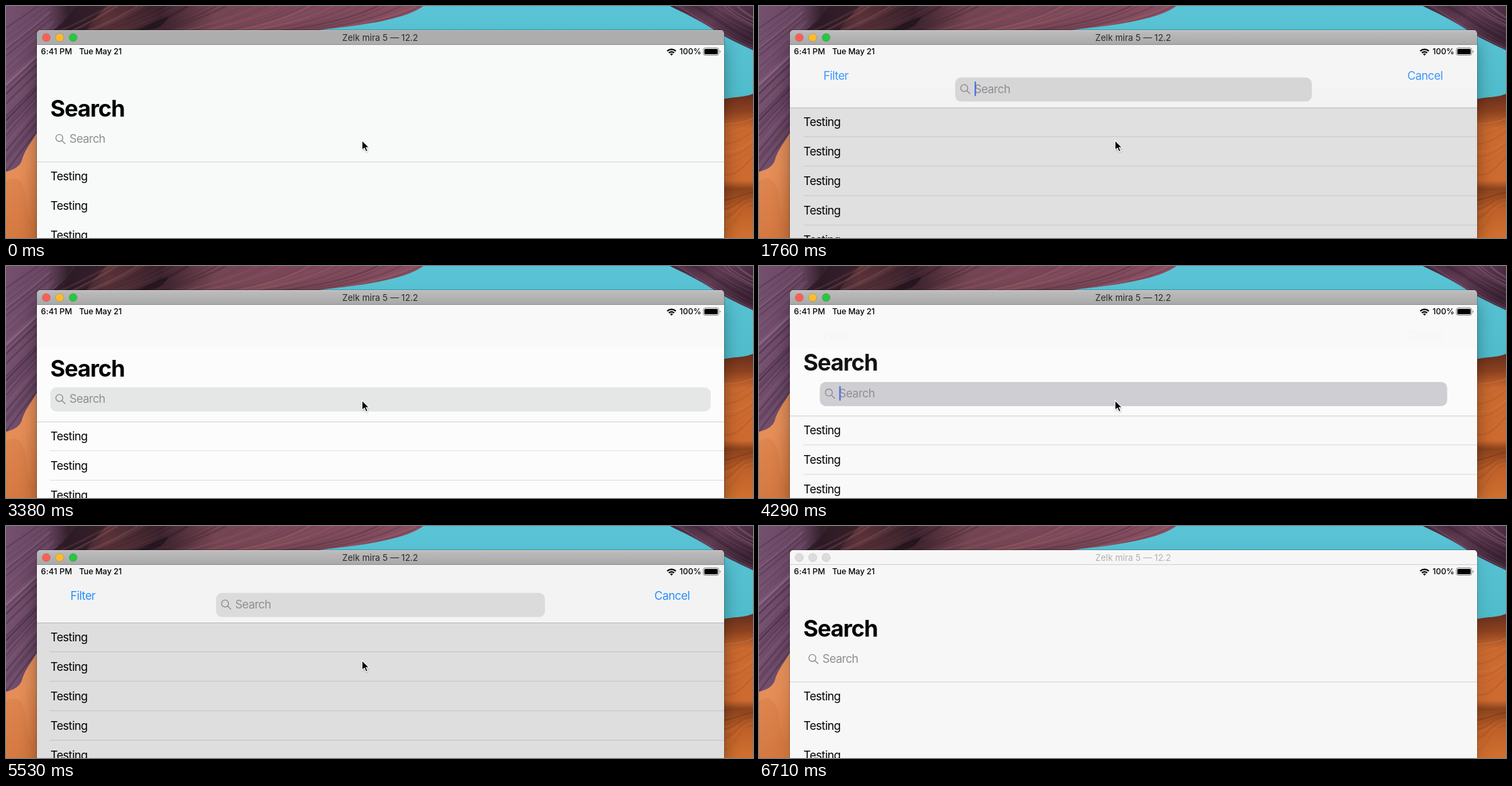
An HTML page for the animation above (6.81 s loop, 1113 by 346 pixels).

```html
<!DOCTYPE html>
<html lang="en">
<head>
<meta charset="utf-8">
<title>Search bar</title>
<style>
  html, body { margin: 0; width: 100%; height: 100%; overflow: hidden; }
  svg { display: block; width: 1113px; height: 346px; }
  text { font-family: Inter, Roboto, sans-serif; white-space: pre; }
  .body { font-size: 17px; letter-spacing: -.5px; }
  .status { font-size: 12px; font-weight: 500; }
  .large { font-size: 34px; font-weight: 700; letter-spacing: -1px; }
  .link { fill: #007aff; }
</style>
</head>
<body>
<svg viewBox="0 0 1113 346" xmlns="http://www.w3.org/2000/svg">
  <defs>
    <linearGradient id="sky" x2="0" y2="1">
      <stop stop-color="#5ac4d6"/><stop offset=".4" stop-color="#4fbccb"/>
    </linearGradient>
    <linearGradient id="plum" gradientUnits="userSpaceOnUse" x1="0" x2="622" y1="0" y2="0">
      <stop stop-color="#74506f"/><stop offset=".1" stop-color="#684560"/>
      <stop offset=".15" stop-color="#33202c"/><stop offset=".24" stop-color="#5b3439"/>
      <stop offset=".37" stop-color="#38212b"/><stop offset=".5" stop-color="#744552"/>
      <stop offset=".75" stop-color="#7b485a"/><stop offset="1" stop-color="#8a5062"/>
    </linearGradient>
    <linearGradient id="dusk" x2="1" y2=".6">
      <stop stop-color="#402639"/><stop offset=".5" stop-color="#5d394f"/><stop offset="1" stop-color="#3a2233"/>
    </linearGradient>
    <linearGradient id="sand" x2=".3" y2="1">
      <stop stop-color="#e09260"/><stop offset=".5" stop-color="#e58d57"/><stop offset="1" stop-color="#d67a40"/>
    </linearGradient>
    <linearGradient id="cliff" x2="0" y2="1">
      <stop stop-color="#672d1f"/><stop offset=".12" stop-color="#8c421f"/>
      <stop offset=".24" stop-color="#cb6a30"/><stop offset=".6" stop-color="#cd6a2f"/>
      <stop offset=".66" stop-color="#8a431d"/><stop offset=".8" stop-color="#bf6029"/>
      <stop offset="1" stop-color="#d0702f"/>
    </linearGradient>
    <linearGradient id="chrome" x2="0" y2="1">
      <stop stop-color="#bdbdbd"/><stop offset="1" stop-color="#a8a8a8"/>
    </linearGradient>
    <filter id="blur" x="-10%" y="-30%" width="120%" height="160%"><feGaussianBlur stdDeviation="13"/></filter>
    <filter id="soft" x="-50%" y="-50%" width="200%" height="200%"><feGaussianBlur stdDeviation="1"/></filter>
    <clipPath id="plumClip"><path id="plumShape" d="M0 0H622C603 14 565 25 480 34L300 60H46V189C36 206 27 216 23 232Q18 243 0 247Z"/></clipPath>
    <clipPath id="duskClip"><path id="duskShape" d="M989 0H1113V66C1092 56 1074 48 1054 35C1034 22 1010 10 989 0Z"/></clipPath>
    <clipPath id="cliffClip"><path id="cliffShape" d="M1060 141C1080 135 1098 137 1113 131V346H1060Z"/></clipPath>
    <clipPath id="winClip"><path d="M46 346V41a5 5 0 0 1 5-5H1065a5 5 0 0 1 5 5V346Z"/></clipPath>
  </defs>

  <rect width="1113" height="346" fill="url(#sky)"/>
  <rect y="180" width="60" height="166" fill="url(#sand)"/>
  <path d="M0 262C16 250 28 262 30 290S44 330 48 346H0Z" fill="#cf7340" opacity=".35"/>
  <use href="#plumShape" fill="url(#plum)"/>
  <g id="plumLines" clip-path="url(#plumClip)" fill="none"></g>
  <use href="#duskShape" fill="url(#dusk)"/>
  <g id="duskLines" clip-path="url(#duskClip)" fill="none"></g>
  <use href="#cliffShape" fill="url(#cliff)"/>
  <g id="cliffLines" clip-path="url(#cliffClip)" fill="none"></g>

  <rect id="shadow" x="46" y="46" width="1024" height="360" rx="6" filter="url(#blur)"/>
  <path d="M45.5 346V41a5.5 5.5 0 0 1 5.5-5.5H1065a5.5 5.5 0 0 1 5.5 5.5V346" fill="none" stroke="#000" stroke-opacity=".22"/>

  <g clip-path="url(#winClip)">
    <rect id="list" x="46" y="58" width="1024" height="288"/>
    <g id="rows"></g>
    <rect id="dim" x="46" width="1024" height="346"/>
    <rect id="nav" x="46" y="58" width="1024"/>
    <rect id="tint" x="46" y="58" width="1024" fill="#f9f9f9"/>
    <rect id="edge" x="46" width="1024" height="1"/>
    <text id="large" class="large" x="66">Search</text>
    <g id="buttons">
      <text class="body link" x="96" y="109.500">Filter</text>
      <text class="body link" x="966" y="109.500">Cancel</text>
    </g>
    <rect id="field" height="36" rx="9"/>
    <g id="hint">
      <g fill="none" stroke="#8a8a8f" stroke-width="1.300" stroke-linecap="round">
        <circle cx="13.500" cy="15.800" r="5.200"/><path d="M17.400 19.700L22 24.300"/>
      </g>
      <text class="body" x="28.500" y="23.300" fill="#8e8e93">Search</text>
      <rect id="caret" x="29" y="6" width="2" height="22" rx="1" fill="#4067e6"/>
    </g>

    <text class="status" x="52" y="72.300" letter-spacing=".15">6:41 PM</text>
    <text class="status" x="109" y="72.300" letter-spacing="-.1">Tue May 21</text>
    <text class="status" x="1003.500" y="72.300">100%</text>
    <g fill="none" stroke="#000" stroke-width="2.100">
      <path d="M985.200 67.300a9 9 0 0 1 12.800 0"/><path d="M987.700 70a5.500 5.500 0 0 1 7.800 0"/>
    </g>
    <path d="M991.600 74L989.400 71.700a3.200 3.200 0 0 1 4.400 0Z"/>
    <rect x="1039" y="62.500" width="23" height="11" rx="3" fill="none" stroke="#000" stroke-opacity=".45"/>
    <rect x="1040.500" y="64" width="20" height="8" rx="1.600"/>
    <path d="M1063.500 66.300q1.500 .5 1.500 1.700t-1.500 1.700Z" opacity=".45"/>

    <rect id="bar" x="46" y="36" width="1024" height="22"/>
    <rect x="46" y="36" width="1024" height="1" fill="#fff" opacity=".25"/>
    <rect id="barEdge" x="46" y="57" width="1024" height="1"/>
    <g id="lights" stroke-width=".8"></g>
    <text id="title" x="557.500" y="51.700" font-size="13" text-anchor="middle">Zelk mira 5 — 12.2</text>
  </g>

  <g id="cursor">
    <path d="M0 1V16L3.600 12.800L6 18L9 16.800L6.700 11.700H11Z" opacity=".35" filter="url(#soft)"/>
    <path d="M0 0V14.500L3.500 11.400L5.900 16.700L8.400 15.600L6.100 10.500H10.600Z" stroke="#fff" stroke-width="1.100"/>
  </g>
</svg>
<script>
const LOOP = 6810, BLUR_AT = 6710;
const NS = 'http://www.w3.org/2000/svg';
const $ = id => document.getElementById(id);
const set = (el, attrs) => { for (const k in attrs) el.setAttribute(k, attrs[k]); };
const add = (parent, tag, attrs, text = '') => {
  const el = document.createElementNS(NS, tag);
  set(el, attrs);
  el.textContent = text;
  return parent.appendChild(el);
};
const clamp = x => Math.min(1, Math.max(0, x));
const mix = (a, b, p) => a + (b - a) * p;
const ramp = (t, start, end) => clamp((t - start) / (end - start));
const ease = x => (1 - Math.cos(Math.PI * x)) / 2;
const blend = (a, b, p) => `rgb(${a.map((v, i) => Math.round(mix(v, b[i], p)))})`;

// Rock strata: jittered curves between two cubic outlines
let seed = 7;
const rand = () => (seed = seed * 16807 % 2147483647) / 2147483647;
function strata(id, from, to, count, colors) {
  for (let i = 0; i < count; i++) {
    const k = (i + rand()) / count;
    const p = from.map((v, j) => (mix(v, to[j], k) + rand() * 4 - 2).toFixed(1));
    add($(id), 'path', {
      d: `M${p[0]} ${p[1]}C${p.slice(2)}`,
      stroke: colors[Math.floor(rand() * colors.length)],
      'stroke-width': (0.6 + rand() * 2.6).toFixed(1),
      opacity: (0.15 + rand() * 0.35).toFixed(2)
    });
  }
}
const plumTones = ['#8d6286', '#a07a96', '#432a42', '#5a3956', '#35213a'];
const warmTones = ['#8a5460', '#2c1a25', '#a0656a', '#4c2b37', '#6d4150'];
strata('plumLines', [-40, 60, -10, 40, 20, 20, 60, -10], [-10, 262, 18, 225, 38, 195, 110, 120], 34, plumTones);
add($('plumLines'), 'path', { d: 'M104 0C94 16 82 28 66 38H118C126 26 138 12 150 0Z', fill: '#281923', opacity: .7 });
add($('plumLines'), 'path', { d: 'M192 38C212 28 222 22 242 16C238 26 226 34 214 38Z', fill: '#1c1118', opacity: .8 });
strata('plumLines', [60, 42, 90, 30, 120, 12, 150, -6], [430, 42, 520, 34, 590, 20, 630, -4], 42, warmTones);
strata('duskLines', [984, -4, 1020, 12, 1055, 40, 1120, 70], [1090, -4, 1095, 6, 1105, 12, 1120, 20], 16, ['#7d5570', '#2b1929', '#8c6079', '#4a2d42']);
strata('cliffLines', [1060, 160, 1080, 152, 1100, 156, 1116, 148], [1060, 250, 1085, 262, 1100, 240, 1116, 225], 11, ['#e08a4e', '#a04e22', '#b9602c']);
strata('cliffLines', [1060, 268, 1080, 262, 1100, 272, 1116, 266], [1060, 340, 1090, 345, 1085, 300, 1116, 300], 9, ['#6d3014', '#d8803f', '#9b4b1f']);

const rows = [0, 1, 2, 3, 4].map(i => {
  add($('rows'), 'text', { class: 'body', x: 66.3, y: 28 + 44 * i }, 'Testing');
  return add($('rows'), 'rect', { x: 66, y: 43 + 44 * i, width: 1004, height: 1, fill: '#dedede' });
});
const lights = ['#fc5f57', '#fdbc2e', '#28c840'].map((color, i) =>
  ({ color, el: add($('lights'), 'circle', { cx: 60 + 20 * i, cy: 47, r: 6 }) }));

// Screen refreshes: [first, last, count]
const ticks = [0];
[[1260, 1440, 3], [1590, 1850, 4], [2300, 2480, 4], [2770, 2890, 3], [3070, 3380, 5],
 [4200, 4550, 5], [4940, 5090, 3], [5440, 6070, 9], [6130, 6300, 4], [BLUR_AT, BLUR_AT, 1]
].forEach(([a, b, n]) => {
  for (let i = 0; i < n; i++) ticks.push(Math.round(mix(a, b, n > 1 ? i / (n - 1) : 0) / 10) * 10);
});
const snap = time => ticks.filter(k => k <= time).pop();

function activeAt(t) {
  if (t < 3070) return ease(ramp(t, 1564, 1850));
  if (t < 4200) return 1 - ease(ramp(t, 3045, 3380));
  if (t < 5440) return ease(ramp(t, 4230, 4550));
  return 1 - ease(ramp(t, 5420, 5809));
}

function caretAt(t) {
  if (t < 1590 || t >= 5440 || (t >= 3070 && t < 4290)) return 0;
  if (t < 2770) return 1 - ramp(t, 2240, 2480);
  if (t < 4200) return ramp(t, 2690, 2890);
  return 1 - ramp(t, 4865, 5090);
}

function draw(time) {
  const t = snap(time);
  const p = activeAt(t);
  const focused = t < BLUR_AT;
  const navY = 232 - 104 * p;
  const fieldX = mix(66, 358, p), fieldY = mix(181, 85, p);
  const page = t < 1590 ? [248, 250, 249] : t < 5440 ? [252, 252, 252] : focused ? [251, 251, 251] : [247, 247, 247];

  set($('list'), { fill: `rgb(${page})` });
  set($('rows'), { transform: `translate(0 ${navY})` });
  rows.forEach(line => set(line, { opacity: t >= 1590 && focused ? 1 : 0 }));
  set($('dim'), { y: navY, opacity: 0.14 * p });
  set($('nav'), { height: navY - 58, fill: blend(page, [241, 241, 241], p) });
  set($('tint'), { height: t < 1680 ? 78 : 64, opacity: t >= 1590 && t < 5440 ? 1 - p : 0 });
  set($('edge'), { y: navY, fill: blend([209, 210, 210], [178, 178, 178], p) });
  set($('large'), { y: 164.5 - 104 * p, opacity: clamp(1.08 - 1.8 * p) });
  set($('buttons'), { opacity: clamp((p - 0.06) / 0.94) });

  const pressed = t < 3070 || (t >= 4200 && t < 5440);
  const idle = pressed ? [205, 205, 210] : [229, 231, 230];
  set($('field'), {
    x: fieldX, y: fieldY, width: mix(1050, 758, p) - fieldX,
    fill: blend(idle, [217, 217, 217], p),
    opacity: focused ? ramp(t, 1170, 1440) : 0
  });
  set($('hint'), { transform: `translate(${fieldX} ${fieldY})` });
  set($('caret'), { opacity: caretAt(t) });

  set($('shadow'), { y: focused ? 54 : 44, opacity: focused ? 0.34 : 0.14 });
  set($('bar'), { fill: !focused ? '#f6f6f6' : t < 1260 ? '#adadad' : 'url(#chrome)' });
  set($('barEdge'), { fill: focused ? '#8e8e8e' : '#d1d1d1' });
  set($('title'), { fill: focused ? '#2b2b2b' : '#b2b2b2' });
  lights.forEach(({ color, el }) => set(el, {
    fill: focused ? color : '#dcdcdc',
    stroke: focused ? 'rgba(0,0,0,.18)' : '#c4c4c4'
  }));

  const u = Math.max(0, (t - 5840) / 400);
  set($('cursor'), {
    transform: `translate(${530.5 + 438 * u ** 1.13} ${200.5 + 138 * u ** 1.6})`,
    opacity: t < 6300 ? 1 : 0
  });
}

function loop() {
  draw(performance.now() % LOOP);
  requestAnimationFrame(loop);
}
loop();
</script>
</body>
</html>
```
